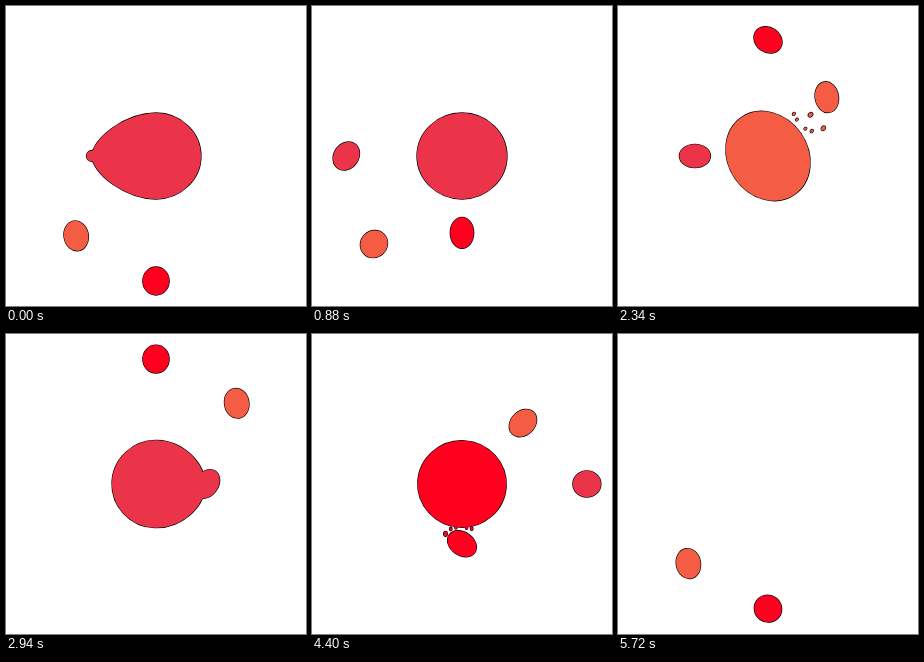
An HTML page with a canvas that plays this animation: 300x300 px, repeating every 5.74 s.

```html
<!DOCTYPE html>
<html>
<head>
<meta charset="utf-8">
<style>
html, body { margin: 0; width: 100%; height: 100%; overflow: hidden; background: #fff; }
canvas { display: block; }
</style>
</head>
<body>
<canvas id="stage" width="300" height="300"></canvas>
<script>
const ctx = document.getElementById('stage').getContext('2d');
const LOOP = 5740, PASS = LOOP / 2, MERGE = 1240, BURST = PASS / 2;
const REACH = 125, RADIUS = 13.6;

// Each drop crosses the middle once per pass, in alternating directions.
const drops = [
  { color: '#eb344a', angle: 0, offset: PASS / 2 },
  { color: '#f45c44', angle: 135, offset: -PASS / 4 },
  { color: '#ff001e', angle: 90, offset: 0 }
];

const mod = (a, n) => ((a % n) + n) % n;
const clamp = x => Math.min(1, Math.max(0, x));

function place(path, shape, angle, along = 0, across = 0, tilt = 0) {
  const m = new DOMMatrix().translate(150, 150).rotate(angle).translate(along, across).rotate(tilt);
  path.addPath(shape, m);
}

function ellipse(a, b) {
  const p = new Path2D();
  p.ellipse(0, 0, a, b, 0, 0, 2 * Math.PI);
  return p;
}

function tear(a, b, tip) {
  const p = new Path2D(), x = a + tip, k = 0.55;
  const h = b * k - tip * 0.33, mid = x * (k - tip / 250);
  p.moveTo(x, 0);
  p.bezierCurveTo(x, h, mid, b, 0, b);
  p.bezierCurveTo(-a * k, b, -a, b * k, -a, 0);
  p.bezierCurveTo(-a, -b * k, -a * k, -b, 0, -b);
  p.bezierCurveTo(mid, -b, x, -h, x, 0);
  return p;
}

function paint(path, color) {
  ctx.lineWidth = 1.3;
  ctx.strokeStyle = '#000';
  ctx.stroke(path);
  ctx.fillStyle = color;
  ctx.fill(path);
}

// Falls in with growing speed and stretch, shoots out and slows down.
function addDrop(path, { u, heading }) {
  const falling = u < MERGE, s = u / 1000, v = (PASS - u) / BURST;
  const along = falling ? 68 * s ** 2.7 - REACH : REACH - 24 * v - 85 * v ** 10;
  const stretch = falling ? 0.03 + 0.14 * s * s : 0.15 * Math.sqrt(v);
  const shape = ellipse(RADIUS * (1 + stretch), RADIUS * (1 - stretch));
  place(path, shape, heading, along, 0, falling ? 0 : -55);
}

// Grows a point just before the burst, then recoils and settles.
function addCore(path, { u, heading }) {
  const pull = clamp(1 - Math.abs(u - BURST) / 95);
  const recoil = Math.sin(Math.PI * clamp((u - BURST) / 600)) ** 2;
  const a = 45 - 7.5 * recoil, b = 43 + 5.5 * recoil, tip = 19 * pull;
  place(path, tear(a, b, tip), heading, 0, 0, 15 * recoil);
  if (pull > 0) place(path, ellipse(5.5 * pull, 5.5 * pull), heading, a + tip);
}

function addSplashes(path, { u, heading }) {
  const k = (u - BURST - 95) / 170;
  if (k < 0 || k > 2) return;
  const size = Math.min(1, 2 - k);
  for (let i = 0; i < 6; i++) {
    const wave = Math.sin(2.2 * i - 2.8);
    const along = 46 + 9 * k + (4 + 8 * k) * wave;
    const across = (7 * i - 13) * (0.75 + 0.25 * k);
    const r = size * (1.9 + 0.6 * wave);
    place(path, ellipse(r, r * 0.75), heading, along, across);
  }
}

function draw(t) {
  ctx.clearRect(0, 0, 300, 300);
  const states = drops.map(({ color, angle, offset }) => {
    const p = mod(t + offset, LOOP), half = Math.floor(p / PASS);
    return { color, u: p - half * PASS, heading: angle + 180 * (half + 1) };
  });
  const since = s => mod(s.u - MERGE, PASS);
  const owner = states.reduce((a, b) => since(b) < since(a) ? b : a);

  // The merged body blinks out just before the loop closes.
  if (t < LOOP - 20) {
    const body = new Path2D();
    addCore(body, owner);
    if (owner.u >= BURST) addDrop(body, owner);
    addSplashes(body, owner);
    paint(body, owner.color);
  }
  for (const s of states) {
    if (s === owner) continue;
    const path = new Path2D();
    addDrop(path, s);
    paint(path, s.color);
  }
}

const start = performance.now();
function tick() {
  const t = mod(performance.now() - start, LOOP);
  draw(Math.floor(t / 20) * 20);
  requestAnimationFrame(tick);
}
tick();
</script>
</body>
</html>
```
